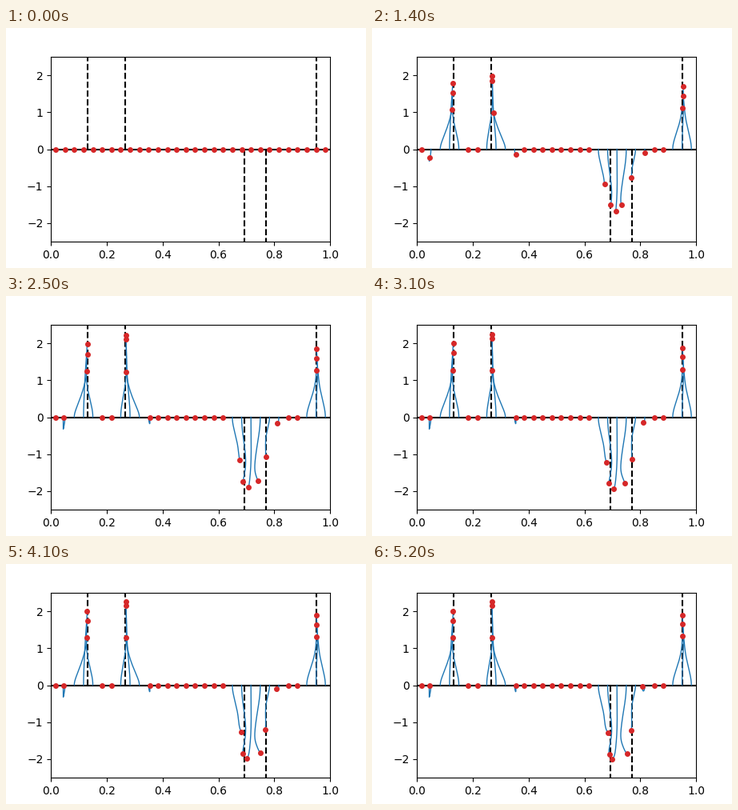
Recreate the animation shown at these times as a matplotlib script. Size 450 px wide and 300 px high, loop 6 s.

```python
import numpy as np
import matplotlib.pyplot as plt
from matplotlib.animation import FuncAnimation

FRAMES, INTERVAL = 60, 100
LAST_STEP = 52      # the flow has settled; the rest of the loop holds
FINE = 20           # integration steps per frame
COUNT = 30          # particles
ORDER = 15          # width of the Dirichlet kernel
PENALTY = 0.95      # sparsity threshold
RATE = 0.05         # growth of heights per frame
MOBILITY = 0.003    # sideways speed relative to growth

spikes = np.array([0.131, 0.266, 0.951, 0.693, 0.7705])
masses = np.array([5.17, 5.75, 4.99, -5.6, -3.02])


def kernel(x, centers):
    """Dirichlet kernel and its derivative at x around each center."""
    orders = np.arange(1, ORDER // 2 + 1)
    phase = 2 * np.pi * (x[:, None] - centers)[..., None] * orders
    value = (1 + 2 * np.cos(phase).sum(axis=-1)) / ORDER
    slope = -4 * np.pi * (orders * np.sin(phase)).sum(axis=-1) / ORDER
    return value, slope


def simulate():
    """Gradient flow of particles that fit the spikes with a sparse sum."""
    gram, _ = kernel(spikes, spikes)
    signal = masses + PENALTY * np.linalg.solve(gram, np.sign(masses))
    x = (np.arange(COUNT) + 0.5) / COUNT
    height = np.zeros(COUNT)
    dt = RATE / FINE
    history = [(x, height)]
    for _ in range(LAST_STEP * FINE):
        value, slope = kernel(x, np.concatenate([spikes, x]))
        weights = np.concatenate([signal, -height])
        grown = height + dt * value @ weights
        x = x + dt * MOBILITY * height * (slope @ weights)
        height = np.sign(grown) * np.maximum(abs(grown) - dt * PENALTY, 0)
        history.append((x, height))
    return np.array(history).transpose(1, 2, 0)


xs, ys = simulate()

fig, ax = plt.subplots(figsize=(4.5, 3), dpi=100)
ax.set_xlim(0, 1)
ax.set_ylim(-2.5, 2.5)
ax.plot([0, 1], [0, 0], "k")
for spike, mass in zip(spikes, masses):
    ax.plot([spike, spike], [0, mass], "k--")
paths = [ax.plot([], [], color="C0", lw=1)[0] for _ in range(COUNT)]
dots, = ax.plot([], [], "o", color="C3", ms=4)


def update(frame):
    now = min(frame, LAST_STEP) * FINE
    for path, x, y in zip(paths, xs, ys):
        path.set_data(x[:now + 1], y[:now + 1])
    dots.set_data(xs[:, now], ys[:, now])
    return [*paths, dots]


animation = FuncAnimation(fig, update, frames=FRAMES, interval=INTERVAL,
                          repeat=True, repeat_delay=0)
plt.show()
```
